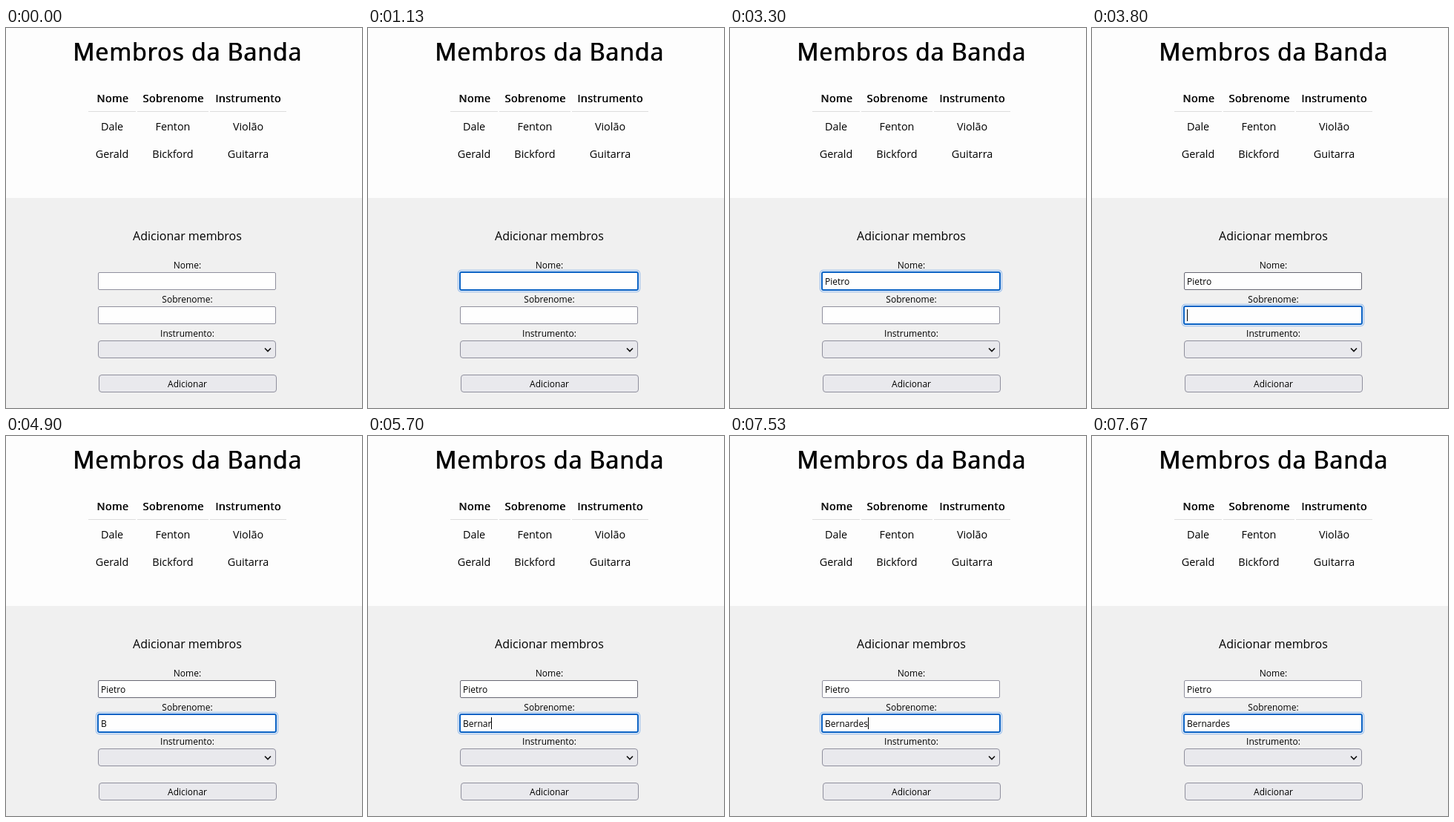
An HTML page for the animation above (8 s loop, 480 px wide and 512 px high).

```html
<!DOCTYPE html>
<html lang="pt">
<head>
<meta charset="utf-8">
<title>Membros da Banda</title>
<style>
  html, body { margin: 0; width: 100%; height: 100%; overflow: hidden; background: #fdfdfd; }
  svg { display: block; width: 480px; height: 512px; font-family: "Open Sans", "Noto Sans", sans-serif; font-size: 12px; }
  .mid { text-anchor: middle; }
  .title { font-size: 32px; letter-spacing: 1px; }
  .table { font-size: 14.4px; }
  .head { letter-spacing: .47px; }
  .form { font-size: 16px; }
  .box { fill: #fefefe; stroke: #8f8f9d; }
  .control { fill: #e9e9ed; stroke: #8f8f9d; }
  .box.hover { stroke: #676774; }
  .control.hover { fill: #d0d0d7; stroke: #676774; }
  .halo { fill: #fefefe; stroke: #a5c4ea; stroke-width: 1.5; }
  .ring { fill: #fefefe; stroke: #0a62c4; stroke-width: 2; }
</style>
</head>
<body>
<svg viewBox="0 0 480 512">
  <rect width="480" height="512" fill="#fdfdfd"/>
  <rect y="229" width="480" height="283" fill="#f0f0f0"/>

  <g class="mid">
    <!-- Bold is the regular face drawn twice, slightly shifted. -->
    <text class="title" id="title" x="244.5" y="44">Membros da Banda</text>
    <use href="#title" x=".9"/>
    <g class="table">
      <g class="head" id="head">
        <text x="143.8" y="100">Nome</text>
        <text x="225.5" y="100">Sobrenome</text>
        <text x="326.5" y="100">Instrumento</text>
      </g>
      <use href="#head" x=".6"/>
      <text x="143" y="138">Dale</text>
      <text x="225" y="138">Fenton</text>
      <text x="326.5" y="138">Violão</text>
      <text x="143" y="175">Gerald</text>
      <text x="225" y="175">Bickford</text>
      <text x="326.5" y="175">Guitarra</text>
    </g>
    <path d="M111 112.5H175M177 112.5H273M275 112.5H378" stroke="#ddd"/>

    <text class="form" x="244.5" y="286">Adicionar membros</text>
    <text x="244.5" y="324">Nome:</text>
    <text x="244.5" y="370">Sobrenome:</text>
    <text x="244.5" y="416">Instrumento:</text>
  </g>

  <rect class="box" id="firstBox" x="124.5" y="329.5" width="239" height="23" rx="1.5"/>
  <rect class="box" x="124.5" y="375.5" width="239" height="23" rx="1.5"/>
  <g id="focus">
    <rect class="halo" x="121.5" y="326.5" width="245" height="29" rx="4"/>
    <rect class="ring" x="124" y="329" width="240" height="24" rx="2"/>
  </g>
  <text id="first" x="128" y="346"></text>
  <text id="last" x="128" y="392"></text>
  <path id="caret" d="M.5 333V349" stroke="#000"/>

  <rect class="control" id="select" x="124.5" y="421.5" width="239" height="23" rx="3.5"/>
  <path d="M349 431.5l4 4 4-4" fill="none" stroke="#111" stroke-width="1.7"/>
  <rect class="control" x="125.5" y="467.5" width="239" height="23" rx="3.5"/>
  <text class="mid" x="244.5" y="484">Adicionar</text>
</svg>
<script>
const LOOP = 8000;
const ROW_GAP = 46;
const FOCUS_FIRST = 600, FOCUS_LAST = 3800;

// Each entry is [time, value from that time on].
const firstTyping = [[0, ""], [1670, "P"], [1800, "Pi"], [2070, "Pie"], [2170, "Piet"],
  [2230, "Piett"], [2500, "Piet"], [2670, "Pietr"], [2770, "Pietro"]];
const lastName = "Bernardes";
const lastTyping = [[0, ""], ...[4670, 5000, 5170, 5430, 5570, 5700, 5970, 6130, 6270]
  .map((time, i) => [time, lastName.slice(0, i + 1)])];
const caretStates = [[0, false], [600, true], [1130, false], [1670, true], [3300, false],
  [3800, true], [4330, false], [4670, true], [4870, false], [5000, true],
  [6500, false], [7070, true], [7600, false]];
const hovers = [["firstBox", 370, 7530], ["select", 7600, 7670]];

const $ = id => document.getElementById(id);
const focusRing = $("focus"), caret = $("caret");
const first = $("first"), last = $("last");

const valueAt = (steps, t) => steps.filter(([time]) => time <= t).pop()[1];
const show = (node, visible) => node.setAttribute("visibility", visible ? "visible" : "hidden");

function draw(t) {
  const onLast = t >= FOCUS_LAST;
  const rowY = onLast ? ROW_GAP : 0;
  const field = onLast ? last : first;

  first.textContent = valueAt(firstTyping, t);
  last.textContent = valueAt(lastTyping, t);
  for (const [id, from, to] of hovers) $(id).classList.toggle("hover", t >= from && t < to);

  show(focusRing, t >= FOCUS_FIRST);
  focusRing.setAttribute("transform", `translate(0 ${rowY})`);

  const caretX = 128 + (field.textContent ? Math.round(field.getComputedTextLength()) : 0);
  show(caret, valueAt(caretStates, t));
  caret.setAttribute("transform", `translate(${caretX} ${rowY})`);
}

const start = performance.now();
function tick() {
  draw((performance.now() - start) % LOOP);
  requestAnimationFrame(tick);
}
tick();
</script>
</body>
</html>
```
